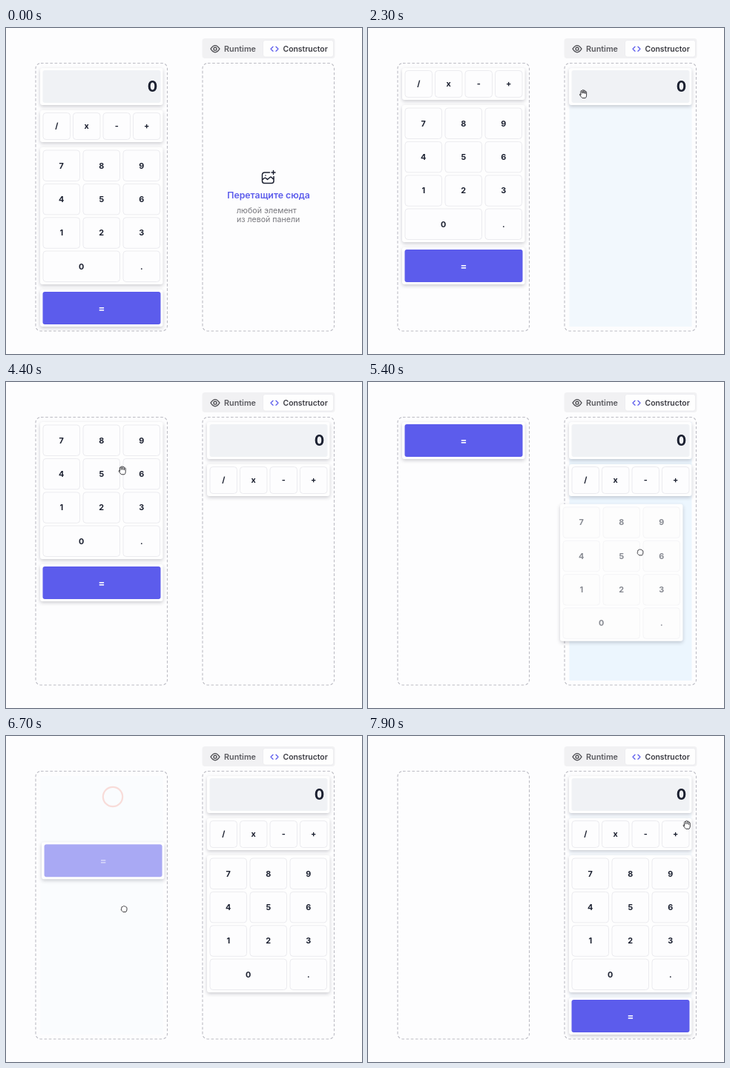
Recreate the animation shown at these times as an HTML page with a canvas. Size 480x440 px, loop 8 s.

```html
<!DOCTYPE html>
<html lang="ru">
<head>
<meta charset="utf-8">
<style>
  html, body { margin: 0; width: 100%; height: 100%; overflow: hidden; background: #fdfdfe; }
  canvas { display: block; width: 480px; height: 440px; }
</style>
</head>
<body>
<canvas id="stage"></canvas>
<script>
const W = 480, H = 440, LOOP = 8000, SHIFT = 225;
const BLUE = '#5c5cec', INK = '#1b2030';
const canvas = document.getElementById('stage');
const ratio = window.devicePixelRatio || 1;
canvas.width = W * ratio;
canvas.height = H * ratio;
const c = canvas.getContext('2d');

const clamp = v => Math.max(0, Math.min(1, v));
const ramp = (t, start, len) => clamp((t - start) / len);
const smooth = u => u * u * (3 - 2 * u);
const easeOut = u => 1 - (1 - u) * (1 - u);
const mix = (a, b, u) => a + (b - a) * u;

function box(x, y, w, h, r, fill, stroke, line = 1) {
  c.beginPath();
  c.roundRect(x, y, w, h, r);
  if (fill) { c.fillStyle = fill; c.fill(); }
  if (stroke) { c.strokeStyle = stroke; c.lineWidth = line; c.stroke(); }
}

function text(s, x, y, size, weight, color, align = 'center') {
  c.font = `${weight} ${size}px Inter, "Open Sans", sans-serif`;
  c.textAlign = align;
  c.fillStyle = color;
  c.fillText(s, x, y);
}

function shape(d, x, y, color, width, fill) {
  const path = new Path2D(d);
  c.save();
  c.translate(x, y);
  c.lineJoin = c.lineCap = 'round';
  if (fill) { c.fillStyle = fill; c.fill(path); }
  c.strokeStyle = color;
  c.lineWidth = width;
  c.stroke(path);
  c.restore();
}

function key(label, x, y, w, h) {
  box(x + .5, y + .5, w - 1, h - 1, 4, '#fdfdfe', '#ebebef');
  text(label, x + w / 2, y + h / 2 + 3.8, 10.8, 700, INK);
}

// Calculator blocks; contents are relative to the card's top left corner.
const blocks = [
  { h: 50, y: 54, draw() {
    box(3.5, 3, 159, 44, 3, '#f0f2f5');
    text('0', 158.3, 32, 20, 700, INK, 'right');
  } },
  { h: 43, y: 111, draw() {
    ['/', 'x', '-', '+'].forEach((s, i) => key(s, 3.5 + i * 40.5, 3, 37.5, 37));
  } },
  { h: 185, y: 161, draw() {
    '789456123'.split('').forEach((s, i) =>
      key(s, 3.5 + i % 3 * 54, 3.5 + Math.floor(i / 3) * 45.4, 50.5, 42.5));
    key('0', 3.5, 139.5, 104.5, 42.5);
    key('.', 111.5, 139.5, 50.5, 42.5);
  } },
  { h: 50, y: 353, draw() {
    box(3.5, 3, 159, 44, 3, BLUE);
    text('=', 83, 30, 13, 700, '#fff');
  } }
];

// start/len: drag time, leave: list closes up, drop: release,
// px/py: press point, dx/dy: cursor travel, bend: arc, pow: sideways delay
const drags = [
  { start: 1024, len: 900, leave: 1466, drop: 1950, px: 146, py: 87, dx: 240, dy: 0, bend: 28, pow: 1 },
  { start: 2780, len: 800, leave: 3200, drop: 3700, px: 161, py: 92, dx: 231, dy: 57, bend: 8, pow: 1 },
  { start: 4500, len: 1000, leave: 4960, drop: 5550, px: 154, py: 119, dx: 219, dy: 114, bend: 0, pow: 1 },
  { start: 6210, len: 1000, leave: 6950, drop: 7450, px: 144, py: 82, dx: 225, dy: 299, bend: 6, pow: 3.75 }
];

// Cursor offset (x, y) and the offset of the card trailing behind it.
function travel(d, t) {
  const u = ramp(t, d.start, d.len), e = smooth(u);
  const follow = Math.min(1, 1.2 * u);
  const x = d.dx * e ** d.pow;
  const y = d.dy * e + d.bend * 4 * e * (1 - e);
  return { x, y, cardX: x * follow ** d.pow, cardY: y * follow };
}

// Top of block i in the left list.
function leftY(i, t) {
  let y = blocks[i].y;
  for (let k = 0; k < i; k++) {
    y -= (blocks[k].h + 7) * easeOut(ramp(t, drags[k].leave, 200));
  }
  return y;
}

function card(i, x, y, alpha) {
  const b = blocks[i];
  c.save();
  c.translate(x, y);
  c.shadowColor = 'rgba(30,30,50,.22)';
  c.shadowBlur = 5 * ratio;
  c.shadowOffsetY = 2 * ratio;
  box(0, 0, 165.5, b.h, 3, '#fefefe');
  c.shadowColor = 'transparent';
  c.globalAlpha = alpha;
  b.draw();
  c.restore();
}

function drawCard(i, t) {
  const d = drags[i], m = travel(d, t);
  const settle = easeOut(ramp(t, d.drop, 200));
  const alpha = mix(mix(1, .52, ramp(t, d.start, 100)), 1, settle);
  const y = leftY(i, Math.min(t, d.start));
  card(i, mix(46 + m.cardX, 46 + SHIFT, settle),
    mix(y + m.cardY, blocks[i].y, settle), alpha);
}

function panel(x) {
  c.setLineDash([3.6, 2.6]);
  box(x + .5, 47.5, 177.5, 361.5, 7, null, '#bcbcc4', 1.1);
  c.setLineDash([]);
}

function zones(t) {
  for (const d of drags) {
    const left = .22 * ramp(t, d.start + 100, 200) * (1 - ramp(t, d.leave, 120));
    const right = ramp(t, d.start + d.len * .72, 150) * (1 - ramp(t, d.drop + 200, 400));
    [[46.5, left], [46.5 + SHIFT, right]].forEach(([x, a]) => {
      if (!a) return;
      c.globalAlpha = a;
      c.fillStyle = '#ecf6fe';
      c.fillRect(x, 54, 165, 349);
    });
  }
  c.globalAlpha = 1;
}

function header() {
  box(264.5, 14, 179, 27, 4, '#f1f1f3');
  box(346.5, 16.5, 95, 22.5, 3, '#fefefe', '#e9e9ed', .7);
  shape('M-6 0Q-3-4.6 0-4.6T6 0Q3 4.6 0 4.6T-6 0zM2 0a2 2 0 1 1-4 0a2 2 0 1 1 4 0z', 282, 28.2, '#4b4b50', 1.3);
  text('Runtime', 294, 32, 10.8, 600, '#5b5b60', 'left');
  shape('M-2-3L-5 0L-2 3M2-3L5 0L2 3', 362, 28.3, BLUE, 1.3);
  text('Constructor', 373.5, 32, 10.4, 600, '#3b3b42', 'left');
}

function hint() {
  shape('M2-6.5H-5a3 3 0 0 0-3 3V5a3 3 0 0 0 3 3H4.5a3 3 0 0 0 3-3V-1' +
    'M-8 3.5L-5 1Q-4 .3-3 1.2L-1 3L2.5 0Q3.6-.8 4.6 .2L7.5 3' +
    'M7-9V-4M4.5-6.5H9.5M-3.6-2.6h.2', 353.5, 201.5, INK, 1.5);
  text('Перетащите сюда', 354, 229.5, 12.3, 600, BLUE);
  text('любой элемент', 311, 249.5, 10.6, 400, '#77777d', 'left');
  text('из левой панели', 311, 262, 10.6, 400, '#77777d', 'left');
}

const OPEN = 'M-3.5 1V-3.5a1 1 0 0 1 2 0V-1V-4.6a1 1 0 0 1 2 0V-1V-4a1 1 0 0 1 2 0V-.5' +
  'V-2.6a.9.9 0 0 1 1.8 0V2q0 2-1.4 3.4H-1.4Q-3 4-5 .8a.9.9 0 0 1 1.5-.6z';
const FIST = 'M-3.4-1.6Q-3.2-3.6-1.6-3.2Q-.6-4.6.4-3.6Q1.8-4.2 2.3-2.8Q4-2.8 3.9-1' +
  'V.8Q3.8 2.6 2.6 4H-1.4Q-2.4 3-3.6 1.6Q-4.6 .2-3.4-.2z';

function cursor(t) {
  if (t < 150) return;
  const i = drags.findIndex(d => t < d.drop);
  const d = drags[i];
  if (d && t >= d.start) {
    const m = travel(d, t);
    shape(FIST, d.px + m.x, d.py + m.y, '#3a3a3e', 1, '#fff');
    return;
  }
  const prev = drags[i < 0 ? 3 : i - 1];
  const from = prev ? [prev.px + prev.dx, prev.py + prev.dy, prev.drop] : [395, 34, 150];
  const to = d ? [d.px, d.py, d.start - 50] : [430, 120, 7850];
  const u = smooth(ramp(t, from[2], to[2] - from[2]));
  shape(OPEN, mix(from[0], to[0], u), mix(from[1], to[1], u), '#3a3a3e', 1, '#fff');
}

function rings(t) {
  for (const d of drags) {
    const u = (t - d.start) / 620;
    if (u < 0 || u > 1) continue;
    c.globalAlpha = 1 - u * u;
    c.beginPath();
    c.arc(d.px, d.py, 6 + 7.5 * easeOut(u), 0, Math.PI * 2);
    c.strokeStyle = '#f3a79c';
    c.lineWidth = 2.2;
    c.stroke();
  }
  c.globalAlpha = 1;
}

function draw(t) {
  c.setTransform(ratio, 0, 0, ratio, 0, 0);
  c.fillStyle = '#fdfdfe';
  c.fillRect(0, 0, W, H);
  header();
  panel(39.5);
  panel(39.5 + SHIFT);
  zones(t);
  if (t < drags[0].drop) hint();
  const held = drags.findIndex(d => t >= d.start && t < d.drop + 200);
  blocks.forEach((b, i) => { if (i !== held) drawCard(i, t); });
  if (held >= 0) drawCard(held, t);
  rings(t);
  cursor(t);
}

const began = performance.now();
function tick() {
  draw((performance.now() - began) % LOOP);
  requestAnimationFrame(tick);
}
tick();
</script>
</body>
</html>
```
